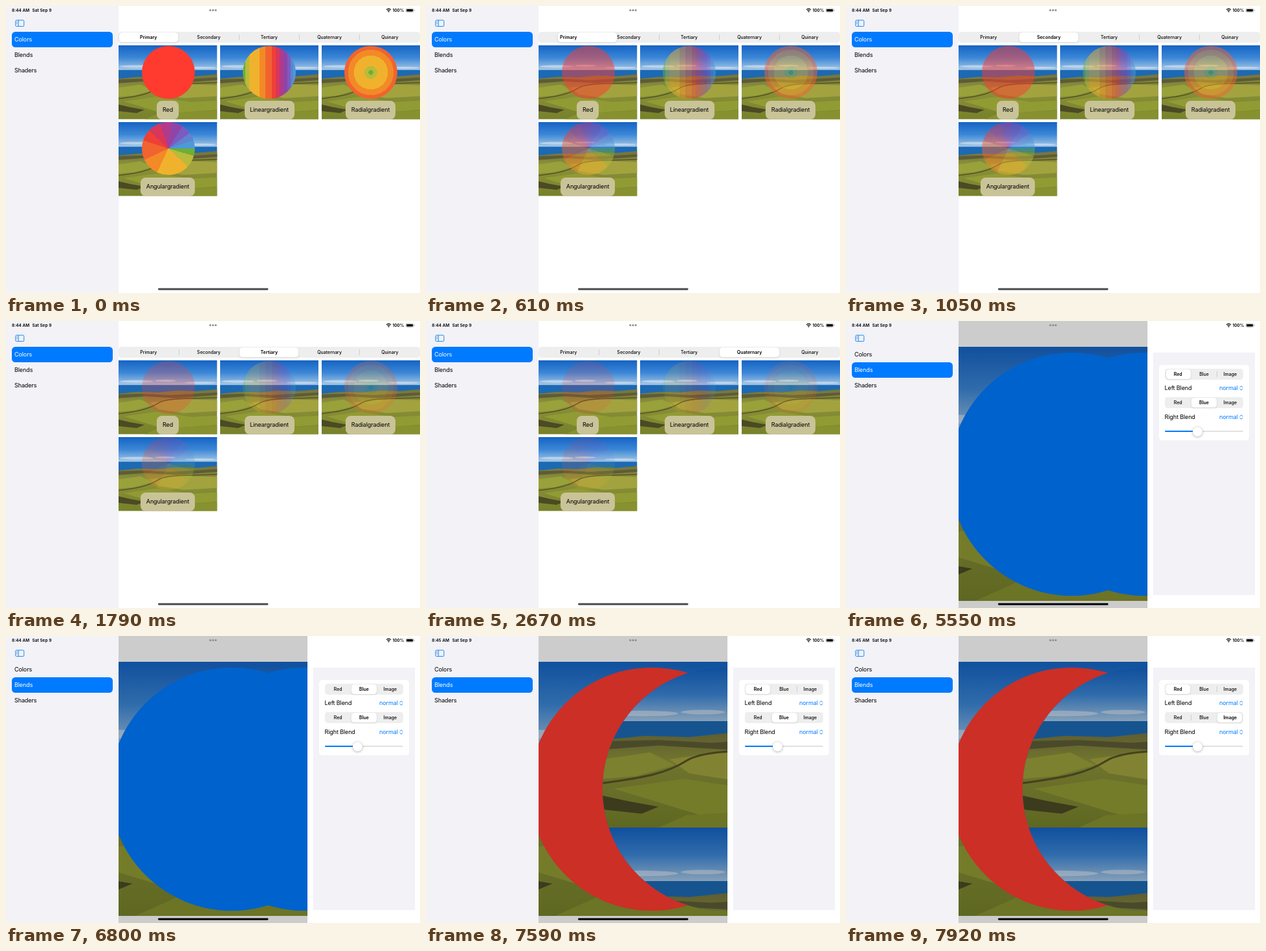
Recreate the animation shown at these times as an HTML page. Size 640 by 445 pixels, loop 8 s.

```html
<!DOCTYPE html>
<html lang="en">
<head>
<meta charset="utf-8">
<title>Fill styles and blends</title>
<style>
  html, body { margin: 0; width: 100%; height: 100%; overflow: hidden; background: #fff; }
  body { position: relative; font: 9.1px Inter, "Open Sans", sans-serif; letter-spacing: -.15px; color: #000; }
  div, svg { position: absolute; }
  div { white-space: pre; box-sizing: border-box; }
  .small { font-size: 7px; font-weight: 500; letter-spacing: 0; text-align: center; }
  .status { font-size: 6.5px; font-weight: 600; letter-spacing: 0; }
  .bar { background: #eeeeef; border-radius: 4.5px; }
  .pill { background: #fff; border-radius: 4px; box-shadow: 0 1px 3px #0002, 0 0 .5px #0003; }
  .tag { background: #c9c398; border-radius: 8px; text-align: center; }
  .disc { border-radius: 50%; }
  .link { color: #007aff; }
</style>
</head>
<body>
<svg width="0" height="0">
  <defs>
    <linearGradient id="sky" x2="0" y2="1">
      <stop stop-color="#1463c4"/><stop offset=".5" stop-color="#3b86d6"/><stop offset="1" stop-color="#a9c9e6"/>
    </linearGradient>
    <linearGradient id="land" x2="0" y2="1">
      <stop stop-color="#73713f"/><stop offset=".3" stop-color="#8b9139"/><stop offset="1" stop-color="#76812a"/>
    </linearGradient>
    <symbol id="scene" viewBox="0 0 152 115" preserveAspectRatio="xMidYMid slice">
      <rect width="152" height="39" fill="url(#sky)"/>
      <g fill="#e4ecf4" opacity=".55">
        <ellipse cx="28" cy="33" rx="26" ry="2"/><ellipse cx="72" cy="32" rx="16" ry="1.6"/><ellipse cx="126" cy="35" rx="24" ry="1.5"/>
      </g>
      <rect y="38.5" width="152" height="20" fill="#1c69b4"/>
      <path d="M0 52 30 49 62 50 90 47 120 48 152 45V115H0Z" fill="url(#land)"/>
      <path d="M0 53 40 52 78 54 152 50V54L90 59 40 56 0 59Z" fill="#5d5c36"/>
      <path d="M48 66 88 60 152 62V79L100 82 62 76Z" fill="#a2a33f"/>
      <path d="M0 66 34 61 52 70 24 78 0 80Z" fill="#99a13b"/>
      <path d="M8 87 58 80 112 88 152 86V100L70 106Z" fill="#919b34"/>
      <path d="M0 83C30 79 46 76 60 67S112 60 152 58" fill="none" stroke="#575325" stroke-width="1.5"/>
      <path d="M0 92 18 96 40 100 28 105 0 102Z" fill="#4b4a24"/>
      <path d="M60 106 152 101V115H40Z" fill="#87912f"/>
    </symbol>
  </defs>
</svg>
<script>
const box = (x, y, w, h, cls = '', style = '', inner = '') =>
  `<div class="${cls}" style="left:${x}px;top:${y}px;width:${w}px;height:${h}px;line-height:${h}px;${style}">${inner}</div>`;
// y is the middle of the capitals
const text = (x, y, str, cls = '', id = '') => box(x, y - 6, 100, 12, cls, '', `<span id="${id}">${str}</span>`);
const scene = (x, y, w, h) => `<use href="#scene" x="${x}" y="${y}" width="${w}" height="${h}"/>`;

// Segmented control; returns markup, and is moved later by moveSeg
const segs = {};
function seg(id, x, y, w, names) {
  const n = names.length, sw = w / n;
  segs[id] = { sw, n };
  return box(x, y, w, 17, 'bar', '',
    names.slice(1).map((_, i) => box((i + 1) * sw - .25, 4, .6, 9, 'gap', 'background:#cfcfd3')).join('') +
    box(1, 1, sw - 2, 15, 'pill') +
    names.map((s, i) => box(i * sw, 0, sw, 17, 'small name', '', s)).join('')
  ).replace('<div', `<div id="${id}"`);
}
function moveSeg(id, pos) {
  const el = document.getElementById(id), { sw } = segs[id];
  el.querySelector('.pill').style.left = 1 + pos * sw + 'px';
  el.querySelectorAll('.name').forEach((e, i) => e.style.fontWeight = i === Math.round(pos) ? 600 : 500);
  el.querySelectorAll('.gap').forEach((e, i) => e.style.opacity = Math.abs(i + .5 - pos) < .9 ? 0 : 1);
}

// Colour bands shared by the three gradients: end position in %, colour
const bands = [[4.5, '#6fae35'], [12, '#b9bb3a'], [32, '#f0b22c'], [43, '#f28a27'], [55, '#f1632f'], [62, '#ee4035'],
  [70, '#d8365a'], [77, '#b13a8c'], [84, '#8f45a8'], [90, '#7a5cc0'], [95, '#5f83cf'], [100, '#4a9bd8']];
const stops = bands.map(([end, c], i) => `${c} ${i ? bands[i - 1][0] : 0}% ${end}%`).join(',');

const card = (x, y, name, tagX, tagW, fill) =>
  `<svg style="left:${x}px;top:${y}px" width="152.5" height="114.5">${scene(0, 0, 152.5, 114.5)}</svg>` +
  box(x + 35.5, y + .3, 82, 82, 'disc fill', `background:${fill}`) +
  box(tagX, y + 86, tagW, 28.5, 'tag', '', name);

const colors = seg('tabs', 173.6, 40, 466.4, ['Primary', 'Secondary', 'Tertiary', 'Quaternary', 'Quinary']) +
  card(174, 61.3, 'Red', 233, 34, '#ff3b30') +
  card(330.7, 61.3, 'Lineargradient', 368.5, 77, `linear-gradient(90deg,${stops})`) +
  card(487.5, 61.3, 'Radialgradient', 525, 77, `radial-gradient(circle 82px,${stops})`) +
  card(174, 180, 'Angulargradient', 208, 84, `conic-gradient(from 90deg,${stops})`);

const choices = ['Red', 'Blue', 'Image'];
const blendRow = (y, name) => text(492.5, y, name) + text(577, y, 'normal', 'link') +
  `<svg style="left:607px;top:${y - 4}px" width="8" height="8" fill="none" stroke="#007aff" stroke-width=".9"><path d="M1.6 3 4 .8 6.4 3M1.6 5 4 7.2 6.4 5"/></svg>`;

const blends = `<svg style="left:174px;top:0" width="292" height="445" viewBox="174 0 292 445">
    <clipPath id="round"><circle cx="461.5" cy="237.5" r="188.5"/></clipPath>
    <rect x="174" width="292" height="445" fill="#fff"/>
    <svg x="174" y="40" width="292" height="394">${scene(-117, 0, 526, 394)}</svg>
    <circle id="leftDisc" cx="349" cy="237.5" r="188.5"/>
    <circle id="rightDisc" cx="461.5" cy="237.5" r="188.5" fill="#007aff"/>
    <g id="rightImage" clip-path="url(#round)">${scene(273, 49, 328, 248)}${scene(273, 297, 328, 248)}</g>
    <rect x="174" width="292" height="445" opacity=".2"/>
  </svg>` +
  box(475, 49, 157, 376, '', 'background:#f2f2f7') +
  box(484, 68, 139, 117, '', 'background:#fff;border-radius:5px') +
  seg('left', 493, 74, 121, choices) + blendRow(104, 'Left Blend') +
  seg('right', 493, 118, 121, choices) + blendRow(148.5, 'Right Blend') +
  box(493, 170, 121, 2, '', 'background:#e2e2e4;border-radius:1px') +
  box(493, 170, 48, 2, '', 'background:#007aff;border-radius:1px') +
  box(535.5, 163.5, 15, 15, 'disc', 'background:#fff;box-shadow:0 1px 4px #0004,0 0 1px #0003');

document.body.insertAdjacentHTML('beforeend',
  box(0, 0, 174, 445, '', 'background:#f2f2f7') +
  box(9, 40, 156, 24, 'row', 'background:#007aff;border-radius:5.5px') +
  ['Colors', 'Blends', 'Shaders'].map((s, i) => text(13, 52.2 + i * 24, s, 'item')).join('') +
  `<div id="colors">${colors}</div><div id="blends">${blends}</div>` +
  text(9, 6.5, '8:44 AM', 'status', 'clock') + text(40.5, 6.5, 'Sat Sep 9', 'status') + text(597.5, 6.5, '100%', 'status') +
  `<svg width="640" height="445" style="left:0;top:0">
    <g fill="none" stroke="#1a87f0"><rect x="14.8" y="22" width="13" height="9.6" rx="1.6"/><path d="M19.2 22V31.6"/><path d="M16.2 24.3H17.8M16.2 26H17.8M16.2 27.7H17.8" stroke-width=".7"/></g>
    <g fill="#8a8a8d"><circle cx="315.8" cy="6.5" r="1.5"/><circle cx="320" cy="6.5" r="1.5"/><circle cx="324.2" cy="6.5" r="1.5"/></g>
    <g fill="none" stroke="#000" stroke-width="1.1"><path d="M588 5.8Q591.5 2.5 595 5.8M589.4 7.4Q591.5 5.4 593.6 7.4"/></g><circle cx="591.5" cy="8.7" r=".9"/>
    <rect x="618.3" y="4" width="11.6" height="5.4" rx="1.6" fill="none" stroke="#888" stroke-width=".6"/>
    <rect x="619.2" y="4.9" width="9.8" height="3.6" rx=".9"/><path d="M630.8 5.8V7.6" stroke="#888"/>
    <rect id="home" x="235" y="437.6" width="170.5" height="2.8" rx="1.4"/>
  </svg>`);

// Each move: start, interval between pictures, new segment
const moves = {
  tabs: [[500, 110, 1], [1330, 114, 2], [2120, 110, 3]],
  left: [[5550, 108, 1], [6920, 110, 0]],
  right: [[7590, 110, 2]]
};
const ease = u => u * u * (3 - 2 * u);
function follow(first, list, t) {
  let pos = first, to = first;
  for (const [at, step, next] of list) {
    if (t < at) break;
    const passed = Math.floor((t - at) / step) * step;
    pos += (next - pos) * ease(Math.min(1, (passed + 40) / 400));
    to = next;
  }
  return { pos, to };
}

const $ = id => document.getElementById(id);
const fills = document.querySelectorAll('.fill');
const items = document.querySelectorAll('.item');
const row = document.querySelector('.row');
const strength = [1, .5, .25, .15];

function draw(now) {
  const t = now % 8000, page = t < 3480 ? 0 : 1;
  $('colors').style.display = page ? 'none' : 'block';
  $('blends').style.display = page ? 'block' : 'none';
  row.style.top = 40 + page * 24 + 'px';
  items.forEach((e, i) => e.style.color = i === page ? '#fff' : '#000');
  $('home').setAttribute('fill', page ? '#000' : '#4a4a4a');
  $('clock').textContent = t < 6920 ? '8:44 AM' : '8:45 AM';

  const tabs = follow(0, moves.tabs, t), left = follow(0, moves.left, t), right = follow(1, moves.right, t);
  moveSeg('tabs', tabs.pos);
  moveSeg('left', left.pos);
  moveSeg('right', right.pos);
  fills.forEach(e => e.style.opacity = strength[tabs.to]);
  $('leftDisc').setAttribute('fill', left.to ? '#007aff' : '#ff3b30');
  $('rightImage').style.display = right.to === 2 ? '' : 'none';
  requestAnimationFrame(loop);
}
const start = performance.now();
function loop() { draw(performance.now() - start); }
draw(0);
</script>
</body>
</html>
```
